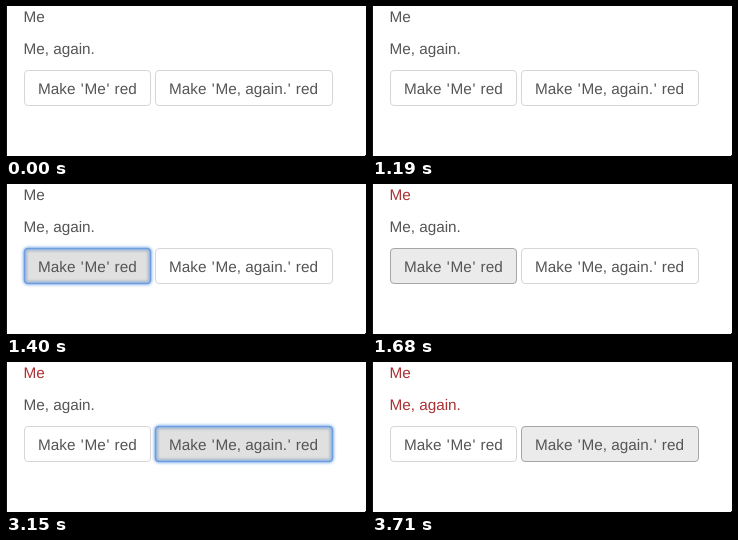
These frames come from a looping animation (360 px wide and 150 px high, 4.62 s). An HTML page:

```html
<!DOCTYPE html>
<html lang="en">
<head>
<meta charset="utf-8">
<title>Red text buttons</title>
<style>
  html, body { margin: 0; width: 100%; height: 100%; overflow: hidden; background: #fff; }
  svg { display: block; width: 360px; height: 150px; }
  text { font: 15.3px "Liberation Sans", Arial, sans-serif; fill: #555; text-rendering: geometricPrecision; }
  .ring { fill: none; stroke: #6b9fe6; }
</style>
</head>
<body>
<svg id="stage" viewBox="0 0 360 150">
  <defs>
    <filter id="soft" x="-10%" y="-30%" width="120%" height="160%">
      <feGaussianBlur stdDeviation="1"/>
    </filter>
  </defs>
  <rect width="360" height="150" fill="#fff"/>
  <rect width="1" height="150" fill="#111"/>
  <rect x="359" y="149" width="1" height="1" fill="#333"/>
</svg>
<script>
const LOOP = 4620;
const stage = document.getElementById("stage");

function add(tag, attrs, parent = stage) {
  const el = document.createElementNS("http://www.w3.org/2000/svg", tag);
  for (const key in attrs) el.setAttribute(key, attrs[key]);
  parent.appendChild(el);
  return el;
}

// Straight quotes get a little air on both sides.
function label(str, x, y) {
  const isQuote = c => c === "'";
  const dx = [...str].map((c, i) => (isQuote(c) + isQuote(str[i - 1])) * 0.85);
  const attrs = { x, y };
  if (str.includes("'")) attrs.dx = dx.join(" ");
  const el = add("text", attrs);
  el.textContent = str;
  return el;
}

function button(str, x, width) {
  const box = { x: x + 0.5, y: 64.5, width: width - 1, height: 35, rx: 3.5 };
  const face = add("rect", box);
  const focus = add("g", {});
  add("rect", { x: x + 2.5, y: 66.5, width: width - 5, height: 31, rx: 3, fill: "none",
    stroke: "#000", "stroke-width": 2, opacity: 0.1, filter: "url(#soft)" }, focus);
  add("rect", { ...box, class: "ring", "stroke-width": 4, opacity: 0.55, filter: "url(#soft)" }, focus);
  add("rect", { ...box, class: "ring", "stroke-width": 1.6, opacity: 0.85 }, focus);
  label(str, x + 14.1, 88);
  return { face, focus };
}

const lines = [label("Me", 17.4, 16), label("Me, again.", 17.4, 48)];
const buttons = [
  button("Make 'Me' red", 18, 127),
  button("Make 'Me, again.' red", 149, 178)
];

const looks = {
  idle: ["#ffffff", "#d6d6d6"],
  hover: ["#ebebeb", "#bcbcbc"],
  press: ["#e0e0e0", "#a0a0a0"],
  release: ["#e6e6e6", "#a0a0a0"],
  held: ["#ebebeb", "#a6a6a6"]
};

// [start, first button, second button, red lines]
const steps = [
  [0, "idle", "idle", 0],
  [1260, "hover", "idle", 0],
  [1330, "press", "idle", 0],
  [1470, "release", "idle", 1],
  [1680, "held", "idle", 1],
  [2590, "held", "hover", 1],
  [3150, "idle", "press", 1],
  [3290, "idle", "release", 2],
  [3640, "idle", "held", 2]
];

function draw(t) {
  const [, a, b, red] = steps.filter(s => s[0] <= t).pop();
  [a, b].forEach((look, i) => {
    const { face, focus } = buttons[i];
    face.setAttribute("fill", looks[look][0]);
    face.setAttribute("stroke", looks[look][1]);
    focus.setAttribute("visibility", look === "press" ? "visible" : "hidden");
  });
  lines.forEach((el, i) => { el.style.fill = i < red ? "#a93236" : "#555"; });
}

const start = performance.now();
function tick(now) {
  draw(Math.max(0, now - start) % LOOP);
  requestAnimationFrame(tick);
}
draw(0);
requestAnimationFrame(tick);
</script>
</body>
</html>
```
